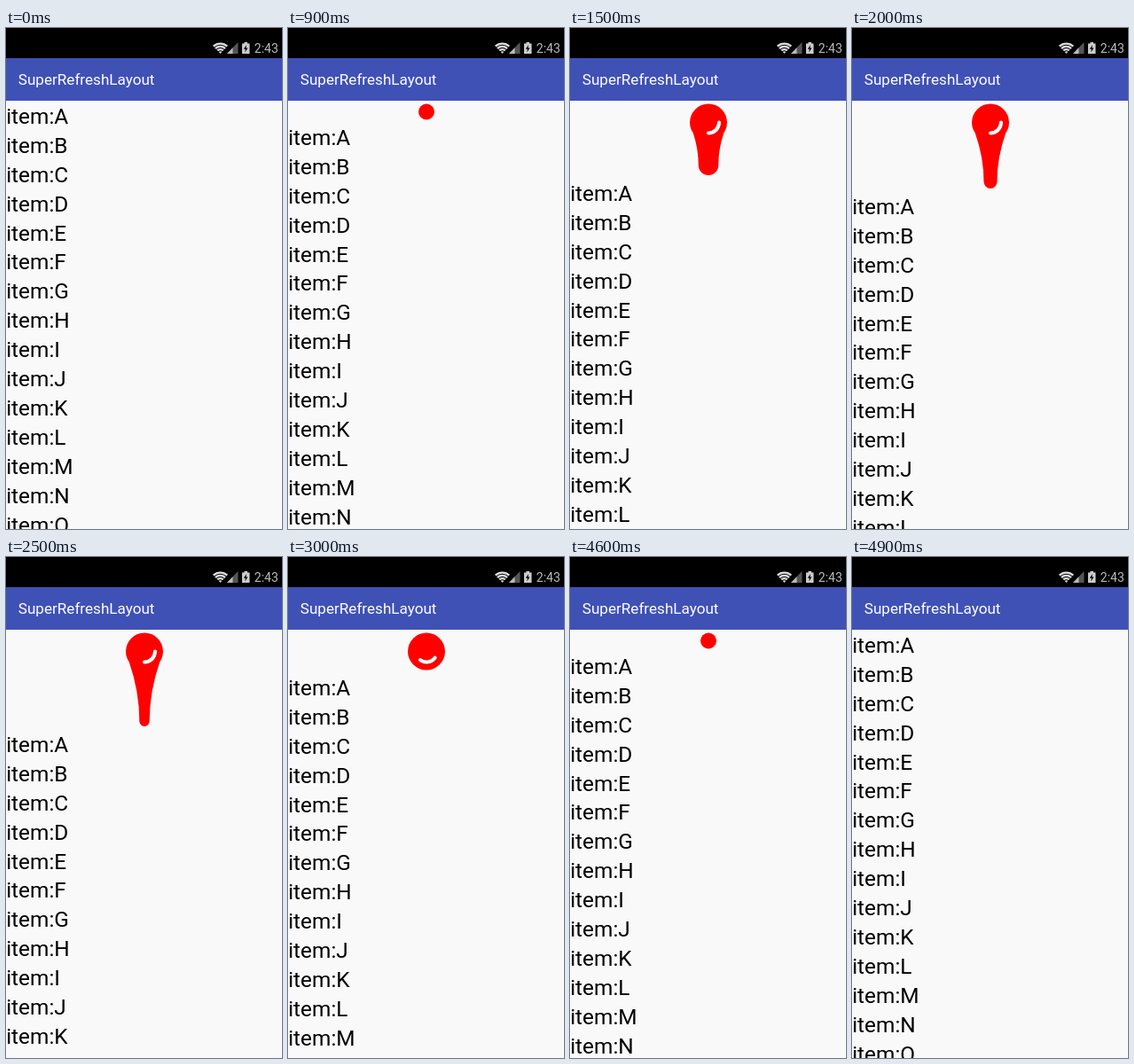
Write an HTML page that moves like this. It is 311 px wide and 565 px high and loops after 6900 ms.

```html
<!DOCTYPE html>
<html>
<head>
<meta charset="utf-8">
<style>
  html, body { margin: 0; width: 100%; height: 100%; overflow: hidden; background: #f9f9f9; }
  svg { display: block; width: 311px; height: 565px; }
  text { font-family: Roboto, sans-serif; white-space: pre; }
  #list { font-size: 24.4px; }
</style>
</head>
<body>
<svg viewBox="0 0 311 565">
  <rect width="311" height="565" fill="#f9f9f9"/>
  <g id="list"></g>
  <g id="drop" fill="#f00">
    <path id="tail"/>
    <circle id="head" cx="156"/>
    <path id="arc" d="M168 106.5A12 12 0 0 1 156 118.5" fill="none" stroke="#fff" stroke-width="4" stroke-linecap="round"/>
  </g>
  <rect width="311" height="34"/>
  <rect y="34" width="311" height="48" fill="#3f51b5"/>
  <text x="13.8" y="64" font-size="17.1" fill="#fff">SuperRefreshLayout</text>
  <g id="wifi" fill="none" stroke="#ddd" stroke-width="2.4"></g>
  <path d="M261.5 16V29H249Z" fill="#555"/>
  <path d="M255.5 22.2V29H249Z" fill="#bbb"/>
  <path d="M268.5 16h3.5v1.5h2.5V29h-8.5V17.5h2.5Z" fill="#ccc"/>
  <path d="M271 19l-3.2 4.8h2.1l-.7 3.7 3.3-5h-2.1Z" fill="#000"/>
  <text x="279.8" y="28" font-size="14" fill="#bbb">2:43</text>
</svg>
<script>
const $ = id => document.getElementById(id);
const LOOP = 6900, STEP = 100, CX = 156, CY = 106.5, R = 21, FULL = 48;
const clamp = (v, a, b) => Math.min(b, Math.max(a, v));

$('list').innerHTML = [...'ABCDEFGHIJKLMNO'].map((c, i) =>
  `<text x="0.2" y="${(107.8 + i * 32.93).toFixed(2)}">item:${c}</text>`).join('');

$('wifi').innerHTML = [1.4, 4.8, 8.1, 11.4].map(r => {
  const s = r * Math.sin(.75), y = 29 - r * Math.cos(.75);
  return `<path d="M${241.5 - s} ${y}A${r} ${r} 0 0 1 ${241.5 + s} ${y}"/>`;
}).join('');

// [time, pull distance] while the finger drags
const drag = [[900, 24], [1200, 60], [1500, 87], [2000, 102], [2500, 112]];
const ease = (t, a, b) => (1 - Math.cos(Math.PI * clamp((t - a) / (b - a), 0, 1))) / 2;

function pull(t) {
  if (t < 900 || t >= 4900) return 0;
  if (t >= 4300) return FULL * (1 - ease(t, 4300, 4900));
  if (t >= 2500) return 112 + (FULL - 112) * ease(t, 2500, 2900);
  const i = drag.findIndex(p => p[0] > t), [t0, a] = drag[i - 1], [t1, b] = drag[i];
  return a + (b - a) * (t - t0) / (t1 - t0);
}

function tailPath(o) {
  const angle = .61 * clamp((o - FULL) / 35, 0, 1);
  const r = Math.max(5.7, R - (o - FULL) / 4), end = 79 + o - r;
  const x = R * Math.cos(angle), y = CY + R * Math.sin(angle), bend = (y + end) / 2;
  return `M${CX - x} ${y}Q${CX - r} ${bend} ${CX - r} ${end}` +
    `A${r} ${r} 0 0 0 ${CX + r} ${end}Q${CX + r} ${bend} ${CX + x} ${y}Z`;
}

function draw(now) {
  const t = Math.floor(now % LOOP / STEP) * STEP, o = pull(t);
  const r = clamp((o - 6) / 2, 0, R);
  $('list').setAttribute('transform', `translate(0 ${o})`);
  $('head').setAttribute('r', r);
  $('head').setAttribute('cy', 85.5 + r);
  $('tail').setAttribute('d', o > FULL + .5 ? tailPath(o) : '');
  $('arc').style.display = o >= FULL ? '' : 'none';
  $('arc').setAttribute('transform', `rotate(${Math.max(0, t - 2900) * .36} ${CX} ${CY})`);
}

let start;
function frame(now) {
  start ??= now;
  draw(now - start);
  requestAnimationFrame(frame);
}
draw(0);
requestAnimationFrame(frame);
</script>
</body>
</html>
```
